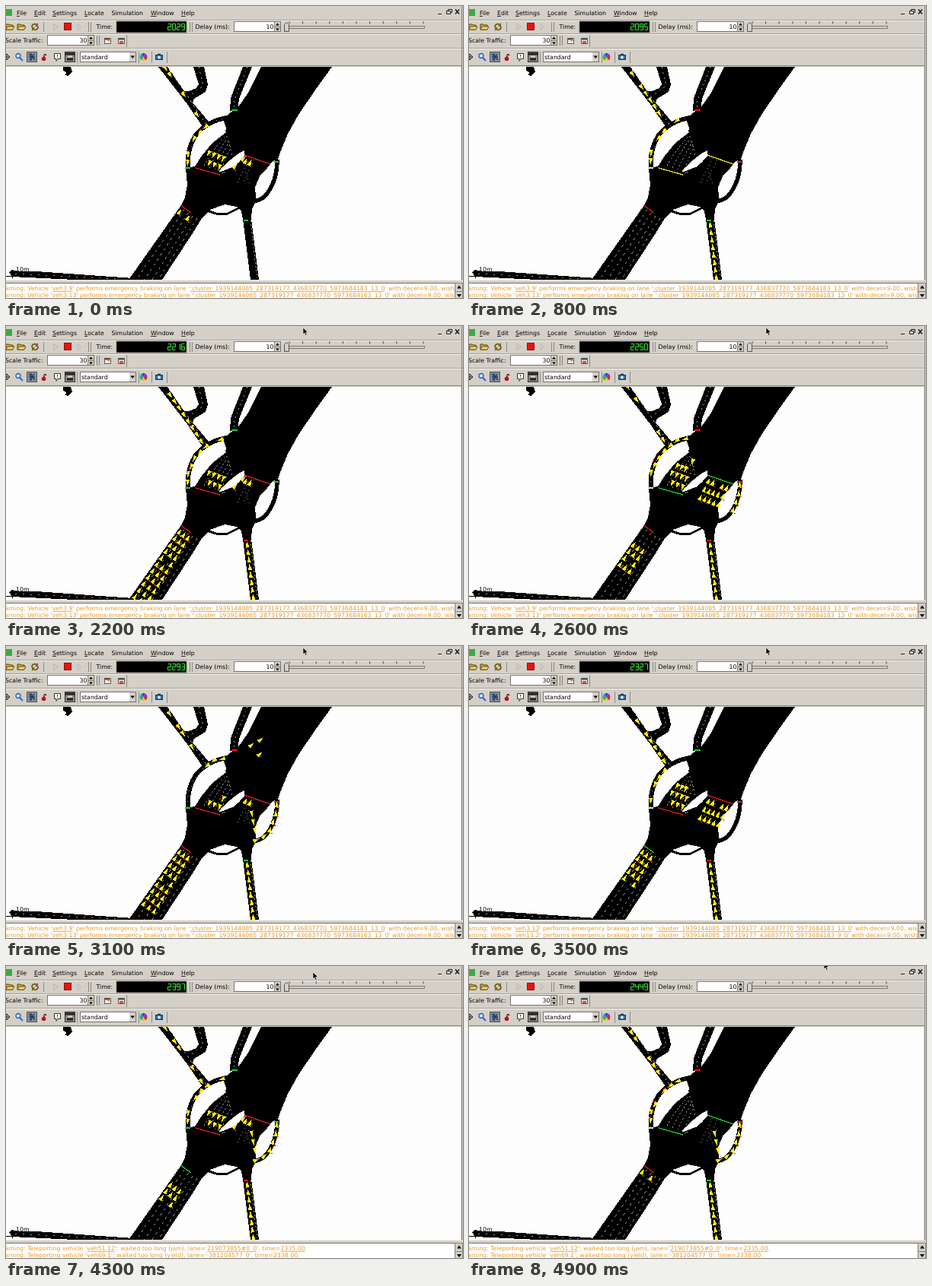
An HTML page for the animation above (5 s loop, 600 px wide and 384 px high).

```html
<!DOCTYPE html>
<html lang="en">
<head>
<meta charset="utf-8">
<title>Traffic simulation</title>
<style>
html, body { margin: 0; width: 100%; height: 100%; overflow: hidden; background: #d4d0c8; }
svg { display: block; width: 100vw; height: 100vh; }
text { font: 7.8px "DejaVu Sans", sans-serif; white-space: pre; text-rendering: geometricPrecision; }
tspan.u { text-decoration: underline; }
#log text { fill: #e69a2c; }
.field { fill: #fff; stroke: #77736d; stroke-width: 1; }
.thin { fill: none; stroke: #222; stroke-width: 1; }
</style>
</head>
<body>
<svg viewBox="0 0 600 384">
  <defs>
    <clipPath id="view"><rect y="80" width="597" height="280"/></clipPath>
  </defs>
  <rect width="600" height="384" fill="#d4d0c8"/>

  <!-- menu bar -->
  <rect y="4" width="8" height="9" fill="#3fa648"/>
  <g id="menu"></g>
  <g class="thin" stroke-width="1.3">
    <path d="M567 10.5H572M578.5 6.5H583.5V10.5H578.5ZM580.5 6V4.5H585.5V8.5H584"/>
    <path d="M590 4.5L595 10.5M595 4.5L590 10.5" stroke-width="1.6"/>
  </g>
  <path d="M0 18.5H600M0 36.5H600M0 55.5H600" stroke="#a5a198"/>
  <path d="M0 19.5H600M0 37.5H600M0 56.5H600" stroke="#f4f2ee"/>
  <path d="M0 78.5H598M598.5 0V360" stroke="#85817a"/>

  <!-- run toolbar -->
  <path d="M0 24H4L5 25H9V31H0ZM15 24H19L20 25H24V31H15Z" fill="#d8a928" stroke="#4b3b10" stroke-width=".9"/>
  <path d="M2 27H11L9 31H0ZM17 27H26L24 31H15Z" fill="#f4d568" stroke="#4b3b10" stroke-width=".8"/>
  <path d="M34 28A4 4 0 0 1 41 25M42 27A4 4 0 0 1 35 30" fill="none" stroke="#77600f" stroke-width="1.8"/>
  <path d="M42 22V27H38ZM34 33V28H38Z" fill="#77600f"/>
  <path d="M49.5 21V34M108.5 21V34M111.5 21V34M241.5 21V34M244.5 21V34" stroke="#8f8b83"/>
  <path d="M62.5 23.5L69 27.5L62.5 31.5ZM94 23.5L99 27.5L94 31.5Z" fill="#d0ccc3" stroke="#bfbbb1"/>
  <rect x="76.5" y="22.5" width="9" height="9" fill="#e81414" stroke="#8c1010"/>
  <text x="118.5" y="30">Time:</text>
  <rect x="145" y="20" width="92" height="15" stroke="#85817a" stroke-width=".8"/>
  <path id="clock" fill="none" stroke="#2ee62e" stroke-width="1.15"/>
  <text x="248.5" y="30">Delay (ms):</text>
  <rect class="field" x="299.5" y="20.5" width="61" height="13"/>
  <rect x="353" y="21" width="7" height="12" fill="#d4d0c8"/>
  <text x="351.5" y="30" text-anchor="end">10</text>
  <path d="M352.5 21V33M353 27.5H360" stroke="#85817a"/>
  <path d="M354 25.5L356.5 22.5L359 25.5ZM354 29.5L356.5 32.5L359 29.5Z"/>
  <path id="ticks" stroke="#333" stroke-width=".8"/>
  <rect x="367.5" y="26.5" width="182" height="3" fill="#d4d0c8" stroke="#66625c" stroke-width=".8"/>
  <path d="M365.5 24.5L368.5 21.5L371.5 24.5V33.5H365.5Z" fill="#d4d0c8" stroke="#55514c"/>

  <!-- scale toolbar -->
  <text x="-1" y="47.5">Scale Traffic:</text>
  <rect class="field" x="54.5" y="38.5" width="61" height="13"/>
  <rect x="108" y="39" width="7" height="12" fill="#d4d0c8"/>
  <text x="106.5" y="48" text-anchor="end">30</text>
  <path d="M107.5 39V51M108 45.5H115M119.5 39V52M122.5 39V52" stroke="#85817a"/>
  <path d="M109 43.5L111.5 40.5L114 43.5ZM109 47.5L111.5 50.5L114 47.5Z"/>
  <g stroke="#5d4941" stroke-width=".9">
    <rect x="129.5" y="42.5" width="8" height="7" fill="#eee9dc"/>
    <rect x="147.5" y="42.5" width="8" height="7" fill="#eee9dc"/>
    <path d="M130 43.5H137M148 43.5H155" stroke="#2c4d84" stroke-width="2"/>
    <path d="M134 46L138 43" stroke="#d9822a" stroke-width="2"/>
    <path d="M149 47H154M149 49H154" stroke="#c8261c" stroke-width="1.6"/>
  </g>
  <path d="M158.5 38V54" stroke="#8f8b83"/>

  <!-- view toolbar -->
  <path d="M-3 67H5M1 63V71M3 65L5 67L3 69M-1 65L1 63L3 65M-1 69L1 71L3 69" class="thin"/>
  <circle cx="16" cy="65.5" r="3" fill="#c6e2fa" stroke="#2268b4" stroke-width="1.3"/>
  <path d="M18 68L22 72" stroke="#2268b4" stroke-width="1.8"/>
  <rect x="27.5" y="60.5" width="13" height="13" fill="#8d8f93" stroke="#55524d"/>
  <path d="M30 63L38 71M30 67H38M33 62V72M37 63L31 71" stroke="#173f70" stroke-width="1.5"/>
  <circle cx="49.5" cy="69.5" r="2.8" fill="#b01818"/>
  <path d="M50 68V65Q51 62 53 65" fill="none" stroke="#7c1414" stroke-width="1.5"/>
  <path d="M63.5 62.5H71.5V69.5H68L66 72.5V69.5H63.5Z" fill="#fffde9" stroke="#333"/>
  <path d="M67.5 64V66.5M67.5 67.5V68.5" stroke="#333"/>
  <rect x="77.5" y="60.5" width="13" height="13" fill="#8c8880" stroke="#33312e"/>
  <path d="M78 63H90M80 70H88" stroke="#222" stroke-width="3"/>
  <path d="M81 66.500H87" stroke="#ddd9d0" stroke-width="2"/>
  <path d="M93.5 60V75" stroke="#8f8b83"/>
  <rect class="field" x="97.5" y="60.5" width="73" height="13"/>
  <text x="99" y="69.5">standard</text>
  <rect x="162" y="61" width="8" height="12" fill="#d4d0c8"/>
  <path d="M163.5 65.5H169L166.2 69Z"/>
  <path d="M174.5 60V75M191.5 60V75M211.5 60V75" stroke="#8f8b83"/>
  <g id="wheel"></g>
  <rect x="196.5" y="64.5" width="9" height="6" fill="#2d6db0" stroke="#17395f"/>
  <path d="M199 63.5H203" stroke="#17395f" stroke-width="1.5"/>
  <circle cx="201" cy="67.5" r="1.9" fill="#d6e8fa"/>

  <!-- road map -->
  <g clip-path="url(#view)" shape-rendering="crispEdges">
    <rect y="80" width="597" height="280" fill="#fdfdfd"/>
    <path d="M335 80H428L407 109L384 143L370 168L361 190L356 205L347 209L334 222L327 238L328 257L323 267L322 280L332 360H321L311 280L309 270L303 264L287 261L268 268L256 281L243 302L205 360H161L204 299L230 262L235 252L238 235L236 213L248 211L257 197L271 180L288 167L289 160L286 152L292 142L304 134L318 114Z"/>
    <path d="M200 80H212L234 112L240 112L250 108L253 103L246 80H260L265 103L262 113L247 122L245 127L267 153L259 160L238 129Z"/>
    <path d="M311 80H323L306 122L304 138H294L295 121Z"/>
    <path d="M290 147Q264 151 249 170Q237 188 239 214" fill="none" stroke="#000" stroke-width="6"/>
    <path d="M356 202Q356 233 339 251Q333 256 324 257" fill="none" stroke="#000" stroke-width="5.500"/>
    <path d="M266 270L276 273H291L309 264" fill="none" stroke="#000" stroke-width="3"/>
    <path d="M313 190Q298 197 286 211L279 217L284 220Q301 213 313 197ZM349 205L353.500 203Q353 233 331 252L329 238L334 225Z" fill="#fdfdfd"/>
    <path d="M280 220L297 213M326 232L327 258" stroke="#000" stroke-width="2"/>
    <path d="M4 350L8 347L14 348.500L40 349L110 354L160 357.500L165 360H90L8 356Z"/>
    <path d="M75 80H85L87 86L82 92L78 91L79 87L75 85Z"/>
    <g id="marks" fill="none" stroke="#d4d4d4" stroke-width=".7"></g>
    <path d="M0 355.500H9M8.500 351V358" stroke="#000"/>
    <g id="signals" fill="none" stroke-width="1.3"></g>
    <path id="cars" fill="#ffee10"/>
    <path id="brakes" fill="#e02020"/>
  </g>
  <text x="13" y="348.5">10m</text>

  <!-- message log -->
  <rect y="360" width="600" height="4" fill="#d4d0c8"/>
  <rect y="364" width="590" height="20" fill="#fff"/>
  <path d="M0 360.5H598" stroke="#f4f2ee"/>
  <path d="M0 364.5H600" stroke="#77736d"/>
  <g id="log"><text y="374"></text><text y="383"></text></g>
  <rect x="589.5" y="364.5" width="10" height="20" fill="#d4d0c8" stroke="#85817a"/>
  <path d="M590 375.5H600" stroke="#85817a"/>
  <path d="M592 371.5L595 367.5L598 371.5ZM592 379L595 383L598 379Z"/>

  <path id="cursor" d="M0 0V9L2 7.2L3.5 10.5L5 9.8L3.6 6.6H6.5Z" stroke="#fff" stroke-width=".6"/>
</svg>
<script>
const $ = id => document.getElementById(id);
const FRAME = 100, FRAMES = 50, CYCLE = 90;

const rnd = (a, b) => {
  const v = Math.sin(a * 12.9898 + b * 78.233) * 43758.5453;
  return v - Math.floor(v);
};

// Linear interpolation in rows of [position, value, value...]
function key(rows, x) {
  let i = 0;
  while (i < rows.length - 2 && x >= rows[i + 1][0]) i++;
  const a = rows[i], b = rows[i + 1];
  const u = Math.min(1, Math.max(0, (x - a[0]) / (b[0] - a[0])));
  return a.slice(1).map((v, j) => v + (b[j + 1] - v) * u);
}

/* ---- fixed parts ---- */
const menu = [[14, '', 'F', 'ile'], [37, '', 'E', 'dit'], [61, '', 'S', 'ettings'], [103, '', 'L', 'ocate'],
  [138.5, 'Simulation', '', ''], [190, '', 'W', 'indow'], [230, '', 'H', 'elp']];
$('menu').innerHTML = menu.map(([x, pre, hot, post]) =>
  `<text x="${x}" y="12">${pre}<tspan class="u">${hot}</tspan>${post}</text>`).join('');

$('ticks').setAttribute('d', Array.from({ length: 11 }, (_, i) => `M${372 + i * 17.6} 20V23.5`).join(''));

const hues = ['#e02020', '#e8c81c', '#38b030', '#20a8b8', '#2848c8', '#a828a8'];
$('wheel').innerHTML = hues.map((c, i) => {
  const p = n => `${180.5 + 5 * Math.cos(n * Math.PI / 3)} ${67 + 5 * Math.sin(n * Math.PI / 3)}`;
  return `<path d="M180.5 67L${p(i)}A5 5 0 0 1 ${p(i + 1)}Z" fill="${c}"/>`;
}).join('');

/* ---- lanes: points run from the head of the queue backwards ---- */
const lanes = (n, make) => Array.from({ length: n }, (_, i) => make(i));
const west = lanes(4, i => [[257 + 7 * i, 209 + 2.7 * i], [267 + 6 * i, 192 + 3 * i], [284 + 3 * i, 171 + 3 * i]]);
const east = lanes(5, i => [[317 + 6 * i, 199 + 2.3 * i], [301 + 6 * i, 231 + 2.3 * i]]);
const main = lanes(3, i => [[231 + 5.5 * i, 266 + 4 * i], [168 + 8 * i, 358 + 4 * i]]);
const north = [[260, 157], [241, 128], [229, 110], [208, 80]];
const ring = [[238, 212], [239, 195], [246, 177], [258, 162], [270, 153], [286, 148]];
const south = [[316, 282], [325, 360]];
const loop = [[356, 203], [354, 222], [347, 241], [338, 251], [329, 255], [326, 238], [323, 222]];

const line = pts => 'M' + pts.map(p => p.join(' ')).join('L');
const dash = (pts, dx, dy, gap) =>
  `<path d="${line(pts)}" transform="translate(${dx} ${dy})" stroke-dasharray="${gap}"/>`;
$('marks').innerHTML =
  west.map(p => dash(p, 3, 1, '2 3')).join('') +
  main.map(p => dash(p, 3, 2, '3 5')).join('') +
  dash(main[2], 9, 5, '3 5') + dash(main[2], 14, 9, '3 5') +
  east.slice(0, 2).map(p => dash(p, 3, 1, '1 4')).join('') +
  dash(north, 3, -1, '3 4') + dash(ring, 0, 0, '1 6') + dash(south, 5, 0, '2 3') +
  dash([[317, 80], [300, 124], [299, 138]], 0, 0, '2 4') +
  dash([[253, 80], [259, 105], [242, 117]], 0, 0, '2 5') +
  dash([[288, 165], [293, 182], [297, 196]], 0, 0, '2 4') +
  dash([[314, 218], [322, 238]], 0, 0, '1 4') +
  dash([[12, 352], [150, 359]], 0, 0, '2 8');

/* ---- signals: [path, colour by cycle second] ---- */
const within = (p, a, b) => p >= a && p < b;
const RED = '#e01818', GREEN = '#20c832', AMBER = '#e8e020';
const straight = p => within(p, 25, 30) ? AMBER : p < 25 ? GREEN : RED;
const lamp = (a, b) => p => within(p, a, b) ? GREEN : RED;
const signals = [
  ['M249 213L281 222', straight],
  ['M313 196L347 208', straight],
  ['M229 262L243 272', lamp(56.8, 85)],
  ['M296 137H304', lamp(45, 80)],
  ['M352 205H358', lamp(45, 70)],
  ['M235 213H242', p => within(p, 40, 60) ? GREEN : '#ddd'],
  ['M312 282H318', lamp(10, 52)]
];
$('signals').innerHTML = signals.map(s => `<path d="${s[0]}"/>`).join('');
const lamps = [...$('signals').children];

/* ---- vehicles ---- */
let yellow, red;
function car(x, y, a) {
  const c = Math.cos(a), s = Math.sin(a), f = n => n.toFixed(1);
  const at = (l, w) => f(x + l * c - w * s) + ' ' + f(y + l * s + w * c);
  yellow += `M${at(1, 0)}L${at(-7.5, 2.6)}L${at(-7.5, -2.6)}Z`;
  if (rnd(x, y) < .35) red += `M${at(-7, 2.6)}h1.5v1.5h-1.5Z`;
}

function place(pts, dist) {
  for (let i = 1; i < pts.length; i++) {
    const [x, y] = pts[i - 1], dx = pts[i][0] - x, dy = pts[i][1] - y;
    const len = Math.hypot(dx, dy);
    if (dist <= len) return car(x + dx * dist / len, y + dy * dist / len, Math.atan2(-dy, -dx));
    dist -= len;
  }
}

function queue(pts, from, to, gap, seed, fill = 1, shift = 0) {
  for (let k = Math.ceil(from); k < to; k++)
    if (rnd(seed, k) < fill) place(pts, k * gap + shift + 2);
}

const westFill = [[0, 3], [10, 0], [30, 0], [43, .9], [49, 1.6], [57, 2], [77, 2.5], [90, 3]];
const eastFill = [[0, 3], [15, 0], [40, 0], [43, .5], [57, .7], [77, 3], [90, 3]];
const mainFill = [[0, 0, .8], [8, 0, 0], [14, 0, 4], [22, 0, 11], [26, 2, 6], [31, 0, 9], [35, 0, 5], [43, 1.5, 5], [46, 1, 2], [49, 0, .8]];
const southFill = [[0, 0], [8, 8], [50, 8]];
const loopFill = [[22, 0], [31, 9], [35, 0], [43, 9], [50, 9]];

function traffic(n, p) {
  yellow = red = '';
  const w = key(westFill, p)[0], e = key(eastFill, p)[0], [m0, m1] = key(mainFill, n);
  west.forEach((l, i) => queue(l, 0, w + (rnd(i, 3) - .5) * Math.min(1, w), 12, i + 1, .9));
  east.forEach((l, i) => queue(l, 0, e - (e < 2 ? i * .25 : 0), 12, i + 11, .95));
  main.forEach((l, i) => queue(l, m0, m1 - (m1 < 1 ? i % 2 : 0), 10.3, i + 21, .95));
  queue(north, 0, 9, 10.5, n + 31, .6, rnd(n, 1) * 4);
  queue(ring, 0, 8, 11, n + 91, .65, rnd(n, 2) * 4);
  queue(south, 0, key(southFill, n)[0], 9.9, 41);
  queue(loop, 0, key(loopFill, n)[0], 11.5, 51, .95);
  if (within(p, 46, 60)) [[303, 208], [314, 198]].forEach(([x, y]) => car(x, y, -.85));
  if (within(p, 40, 46)) [[325, 128], [337, 121], [336, 140]].forEach(([x, y]) => car(x, y, -.7));
  $('cars').setAttribute('d', yellow);
  $('brakes').setAttribute('d', red);
}

/* ---- clock ---- */
const SEGMENTS = { a: 'M0 0h4', b: 'M4 0v4', c: 'M4 4v4', d: 'M0 8h4', e: 'M0 4v4', f: 'M0 0v4', g: 'M0 4h4' };
const DIGITS = ['abcdef', 'bc', 'abged', 'abgcd', 'fgbc', 'afgcd', 'afgedc', 'abc', 'abcdefg', 'abcdfg'];
const digitPath = (d, x) => [...DIGITS[d]].map(s =>
  SEGMENTS[s].replace(/M(\d) (\d)/, (_, u, v) => `M${x + +u} ${23.5 + +v}`)).join('');
const clockKeys = [[0, 2029], [8, 2095], [22, 2216], [31, 2293], [35, 2327], [43, 2397], [49, 2449]];

/* ---- log ---- */
const u = s => `<tspan class="u">${s}</tspan>`;
const brake = (id, end) => `Warning: Vehicle '${u(id)}' performs emergency braking on lane '` +
  u(`:cluster_1939144085_287319177_436837770_5973684183_${end}_0`) + `' with decel=9.00, wished=4.50`;
const teleport = (id, why, lane, time) =>
  `Warning: Teleporting vehicle '${u(id)}'; waited too long (${why}), lane='${u(lane)}', time=${u(time)}.`;
const messages = [brake('veh3.9', 13), brake('veh3.13', 13), brake('veh13.2', 9),
  teleport('veh51.12', 'jam', '219073855#0_0', '2335.00'), teleport('veh69.1', 'yield', '-381204577_0', '2338.00')];
const rows = [...$('log').children];
rows.forEach(r => r.setAttribute('x', -9));
let shown = -1;

function showLog(n) {
  const first = n < 33 ? 0 : n < 36 ? 1 : n < 37 ? 2 : 3;
  if (first === shown) return;
  shown = first;
  rows.forEach((r, i) => { r.innerHTML = messages[first + i]; });
}

const cursorKeys = [[12, 390, -20], [13, 390, -6], [14, 390, 2], [35, 390, 2], [43, 403, 8], [46, 440, 6], [48, 466, 5], [49, 466, -5]];

let last = -1;
function draw(now) {
  const n = Math.floor(now / FRAME) % FRAMES;
  if (n === last) return;
  last = n;
  const time = Math.round(key(clockKeys, n)[0]), phase = time % CYCLE;
  $('clock').setAttribute('d', [...String(time)].map((d, i) => digitPath(d, 212.5 + i * 6)).join(''));
  lamps.forEach((el, i) => el.setAttribute('stroke', signals[i][1](phase)));
  traffic(n, phase);
  showLog(n);
  $('cursor').setAttribute('transform', `translate(${key(cursorKeys, n).join(' ')})`);
}

const start = performance.now();
function tick() {
  draw(performance.now() - start);
  requestAnimationFrame(tick);
}
tick();
</script>
</body>
</html>
```
